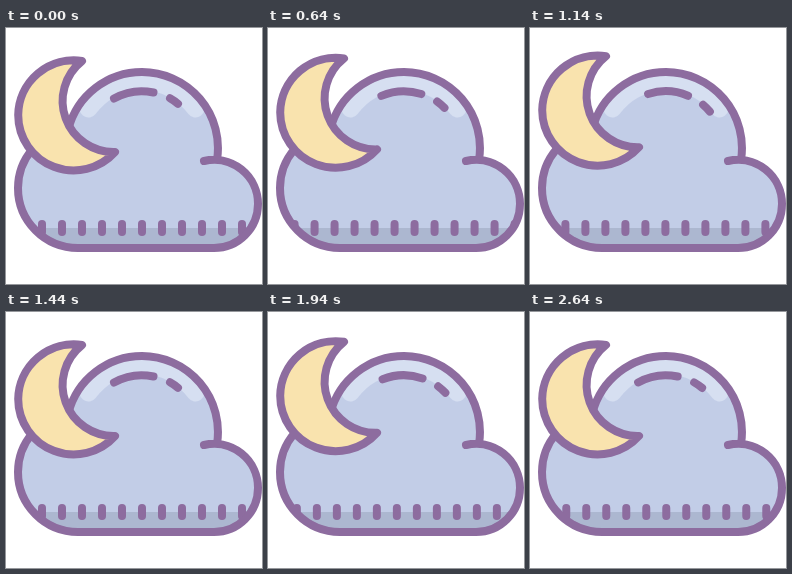
An HTML page without scripts that plays this animation: 256 by 256 pixels, repeating every 2.74 s.

```html
<!DOCTYPE html>
<html lang="en">
<head>
<meta charset="utf-8">
<title>Cloudy night</title>
<style>
  @property --step { syntax: "<number>"; inherits: true; initial-value: 0; }

  html, body { margin: 0; width: 100%; height: 100%; overflow: hidden; background: #fff; }

  svg {
    display: block;
    width: 100%;
    height: 100%;
    --swing: calc((1 - cos(var(--step) * 180deg / 13.5)) / 2);
    animation: swing 2740ms -2ms infinite;
  }

  /* 100 ms steps out, one beat at rest, then back */
  @keyframes swing {
    0%       { --step: 0;  animation-timing-function: step-end; }
    1.4599%  { --step: 1;  animation-timing-function: steps(14); }
    52.5547% { --step: 15; animation-timing-function: step-end; }
    52.5548% { --step: 0;  animation-timing-function: step-end; }
    56.2044% { --step: 12; animation-timing-function: steps(12); }
    100%     { --step: 0; }
  }

  .line { fill: none; stroke: #8d6c9f; stroke-width: 8; stroke-linecap: round; stroke-linejoin: round; }
  .moon { fill: #f9e3ae; transform: translateY(calc(var(--swing) * -5px)); }
  .ticks { transform: translateX(calc(var(--swing) * 20px)); }
  .gloss { transform-origin: 136px 120px; transform: rotate(calc(var(--swing) * 11.5deg)); }
</style>
</head>
<body>
<svg viewBox="0 0 256 256">
  <defs>
    <path id="cloud" d="M198 133A44 44 0 0 1 252 176A44 44 0 0 1 208 220H72A60 60 0 0 1 12 160A60 60 0 0 1 62.4 101A76 76 0 0 1 136 44A76 76 0 0 1 211 132"/>
    <clipPath id="inside"><use href="#cloud"/></clipPath>
    <path id="tick" d="M16 196v8"/>
    <g id="pair"><use href="#tick"/><use href="#tick" x="20"/></g>
    <g id="four"><use href="#pair"/><use href="#pair" x="40"/></g>
  </defs>

  <use href="#cloud" fill="#c2cde7"/>
  <g clip-path="url(#inside)">
    <path d="M0 200H256V224H0z" fill="#acb7d0"/>
    <path d="M82.5 80.5A66 66 0 0 1 189.5 80.5" fill="none" stroke="#d6dff1" stroke-width="18" stroke-linecap="round"/>
    <g class="line ticks">
      <use href="#four" x="-20"/>
      <use href="#four" x="60"/>
      <use href="#four" x="140"/>
      <use href="#pair" x="220"/>
    </g>
  </g>
  <path class="line gloss" d="M108 70.5A57 57 0 0 1 147.5 64.5M164 70.3A57 57 0 0 1 172 75.8"/>
  <use href="#cloud" class="line"/>
  <path class="line moon" d="M76 33A55.5 55.5 0 0 0 12.2 87A55.5 55.5 0 0 0 109 124A51 51 0 0 1 76 33z"/>
</svg>
</body>
</html>
```
